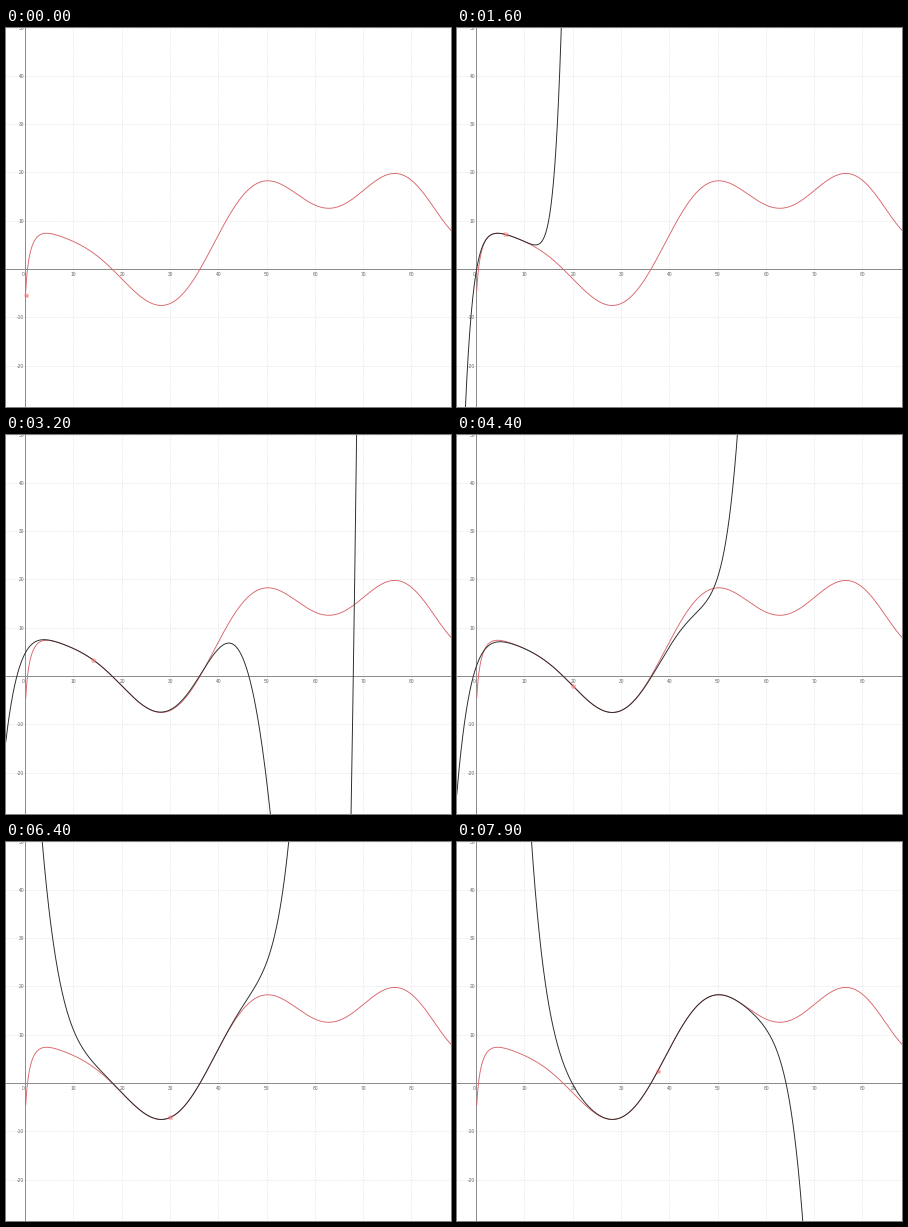
Write a matplotlib script that moves like this. It is 445x379 px and loops after 8000 ms.

```python
import math

import numpy as np
import matplotlib.pyplot as plt
from matplotlib.animation import FuncAnimation

W, H, DPI = 445, 379, 100
X0, Y0, UNIT = 19.5, 241.5, 4.83        # origin and scale in pixels
TOP, BOTTOM = Y0 / UNIT, (Y0 - H) / UNIT
DEGREE = 7
FRAMES, INTERVAL, HOLD, STEP = 80, 100, 4, 0.5
PX = 72 / DPI

FREQ = np.repeat(np.arange(1, 7) * 0.05, 2)
PHASE = np.tile([0, np.pi / 2], 6)

# Zeros, extrema and a few points between them.
KEY_POINTS = [(0, -5), (2.2, 7.15), (4, 7.45), (10, 5), (17.9, 0), (24, -5.5),
              (28, -7.04), (35.9, 0), (40, 7.05), (44, 13.45), (50, 18.3),
              (55, 16.45), (60, 13.4), (63, 12.8), (70, 16.3), (76.7, 19.5),
              (80, 18.5), (84, 13.9), (88, 8.1)]

# Where the Taylor polynomial about each centre turns or leaves the view.
EXITS = {6: [(-2.46, BOTTOM), (12.6, 4.25), (17.74, TOP)],
         14: [(-4.04, -17.9), (42, 7.35), (50.5, BOTTOM), (67.4, BOTTOM)],
         20: [(-3.83, BOTTOM), (54, TOP)],
         24: [(-3.08, BOTTOM), (49.6, TOP)],
         30: [(3.83, TOP), (54.1, TOP)],
         37.5: [(11.5, TOP), (67.7, BOTTOM)]}
EXIT_WEIGHT = 0.2


def basis(x, shift, k=0):
    """k-th derivative of the terms 1, log(x + shift) and the waves."""
    x = np.asarray(x, float)[..., None]
    one = np.full_like(x, k == 0)
    if k == 0:
        log = np.log(x + shift)
    else:
        log = (-1) ** (k - 1) * math.factorial(k - 1) / (x + shift) ** k
    waves = FREQ ** k * np.sin(FREQ * x + PHASE + k * np.pi / 2)
    return np.concatenate([one, log, waves], axis=-1)


def taylor_basis(x, a, shift):
    u = (np.asarray(x, float) - a)[..., None]
    return sum(basis(a, shift, k) * u ** k / math.factorial(k)
               for k in range(DEGREE + 1))


def fit(shift):
    """Least-squares coefficients of the smooth curve, with their error."""
    x, y = np.transpose(KEY_POINTS)
    rows, values = [basis(x, shift)], [y]
    for centre, points in EXITS.items():
        x, y = np.transpose(points)
        rows.append(EXIT_WEIGHT * taylor_basis(x, centre, shift))
        values.append(EXIT_WEIGHT * y)
    ridge = np.r_[0, 0, 0.003 + 0.01 * (FREQ / 0.2) ** 2]
    rows.append(np.diag(ridge))
    values.append(np.zeros(len(ridge)))
    m, v = np.concatenate(rows), np.concatenate(values)
    coef = np.linalg.lstsq(m, v, rcond=None)[0]
    return np.sum((m @ coef - v) ** 2), coef


SHIFT = min(np.arange(0.1, 0.4, 0.01), key=lambda s: fit(s)[0])
COEF = fit(SHIFT)[1]


def to_px(y):
    return np.clip(Y0 - UNIT * y, -600, 1000)


fig = plt.figure(figsize=(W / DPI, H / DPI), dpi=DPI, facecolor="white")
ax = fig.add_axes([0, 0, 1, 1])
ax.set(xlim=(0, W), ylim=(H, 0))
ax.axis("off")

label = dict(family="Liberation Sans", fontsize=4.9 * PX, color="#666666", va="center")
grid = dict(color="#e4e4e4", lw=0.8 * PX, ls=(0, (1.5, 1.5)), zorder=0)
axis = dict(color="#8c8c8c", lw=PX, zorder=1)
for n in range(0, 90, 10):
    x = X0 + n * UNIT
    ax.axvline(math.floor(x), **(grid if n else axis))
    if n:
        ax.text(x, 246, str(n), ha="center", **label)
for n in range(-20, 60, 10):
    y = Y0 - n * UNIT
    ax.axhline(math.floor(y), **(grid if n else axis))
    ax.text(18.3, y if n else 246, str(n), ha="right", **label)

curve_x = np.concatenate([np.linspace(0.05, 2, 300), np.linspace(2, 89, 900)])
ax.plot(X0 + UNIT * curve_x, to_px(basis(curve_x, SHIFT) @ COEF),
        color="#d9646a", lw=0.9 * PX, zorder=2)

poly_px = np.arange(-5, W + 5, 0.25)
poly_x = (poly_px - X0) / UNIT
poly, = ax.plot([], [], color="#2c2c2c", lw=0.95 * PX, zorder=3)
dot, = ax.plot([], [], "o", ms=5 * PX, mfc=(1, 0.35, 0.35, 0.3), mec="none", zorder=4)
cross, = ax.plot([], [], "x", ms=3 * PX, mew=0.6 * PX, color="#ee8080", zorder=4)


def update(i):
    a = max(0, i - HOLD) * STEP
    if a > 0:
        poly.set_data(poly_px, to_px(taylor_basis(poly_x, a, SHIFT) @ COEF))
    else:
        poly.set_data([], [])
    y = to_px(basis(a, SHIFT) @ COEF)
    for mark in (dot, cross):
        mark.set_data([X0 + UNIT * a], [y])
    return poly, dot, cross


anim = FuncAnimation(fig, update, frames=FRAMES, interval=INTERVAL,
                     repeat=True, repeat_delay=0, blit=False)
plt.show()
```
